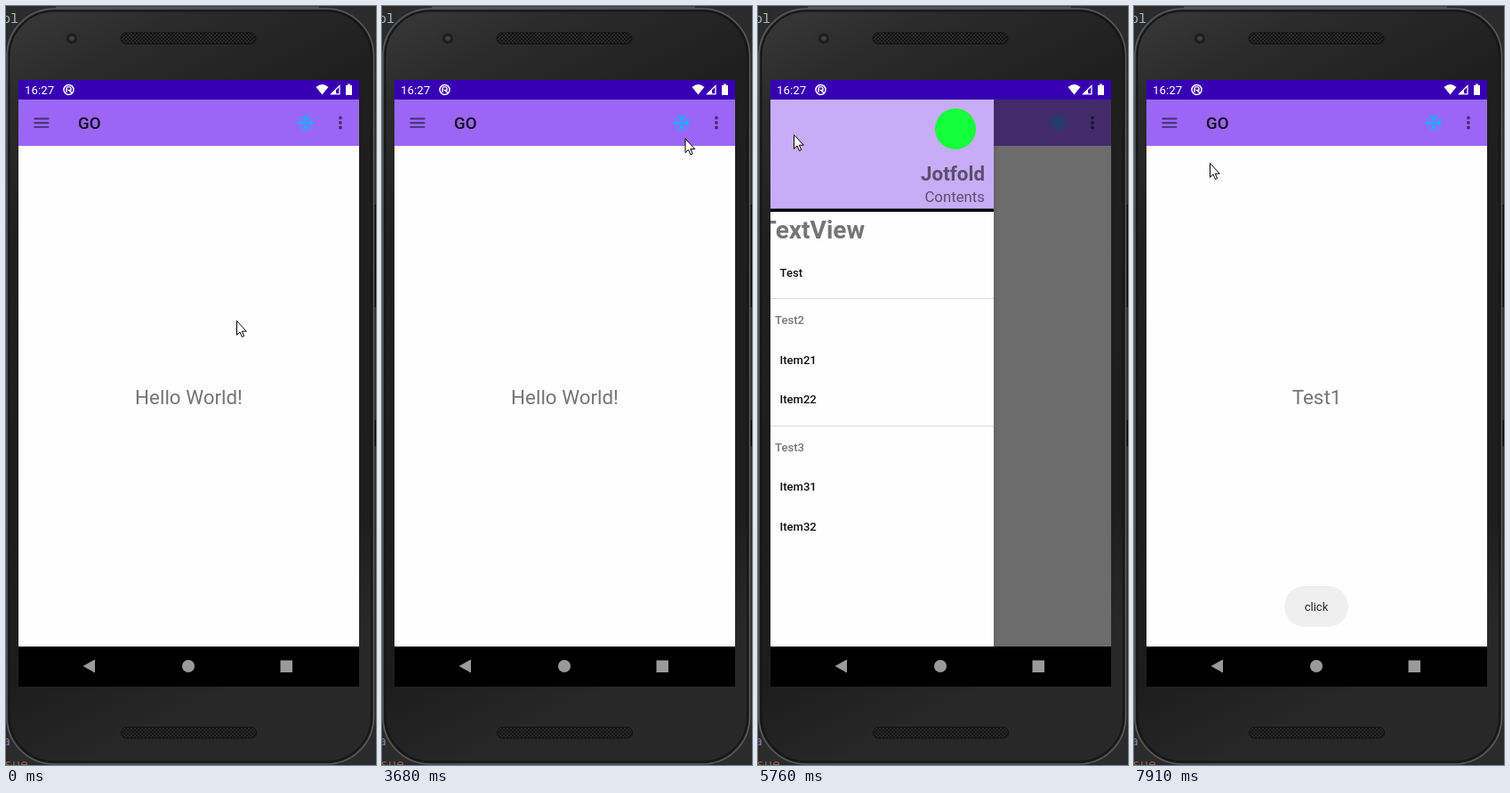
Animation of 416 by 852 pixels, one loop 7990 ms. Source, as an HTML page:

```html
<!DOCTYPE html>
<html lang="en">
<head>
<meta charset="utf-8">
<title>App bar and drawer demo</title>
<style>
  html, body { margin: 0; height: 100%; overflow: hidden; background: #2b2b2b; }
  svg { display: block; width: 416px; height: 852px; font-family: Roboto, sans-serif; }
  .code { font: 15px "Noto Sans Mono", monospace; }
  .soft { fill: #000; fill-opacity: .54; }
  .grey { fill: #757575; }
  .end { text-anchor: end; }
  .mid { text-anchor: middle; }
  .row { font-size: 13.05px; font-weight: 500; }
  .menu { font-size: 14.9px; fill: #212121; }
</style>
</head>
<body>
<svg viewBox="0 0 416 852">
  <defs>
    <linearGradient id="body" x2=".25" y2="1">
      <stop offset="0" stop-color="#393939"/>
      <stop offset=".12" stop-color="#2b2b2b"/>
      <stop offset=".3" stop-color="#1f1f1f"/>
      <stop offset=".85" stop-color="#1d1d1d"/>
      <stop offset="1" stop-color="#282828"/>
    </linearGradient>
    <pattern id="mesh" width="4" height="4" patternUnits="userSpaceOnUse">
      <rect width="4" height="4" fill="#292929"/>
      <circle cx="1" cy="1" r="1" fill="#0b0b0b"/>
      <circle cx="3" cy="3" r="1" fill="#0b0b0b"/>
    </pattern>
    <filter id="shadow" x="-20%" y="-20%" width="140%" height="140%">
      <feDropShadow dx="0" dy="1.5" stdDeviation="2" flood-opacity=".28"/>
    </filter>
    <clipPath id="screen"><path d="M14 105H397V719H14Z"/></clipPath>
    <clipPath id="testRow"><path d="M14 276H275V321H14Z"/></clipPath>
    <clipPath id="reveal"><rect id="revealBox"/></clipPath>
    <path id="arm" d="M0 0V-9.3M-4.7 -7.9L0 -3.2L4.7 -7.9"/>
  </defs>

  <g class="code">
    <text x="-4" y="19" fill="#a9b7c6">pl</text>
    <text x="-4" y="830" fill="#8b7ba8">a</text>
    <text x="-2" y="856" fill="#8a6544">sue</text>
  </g>

  <!-- phone -->
  <path d="M56 1.5H352" stroke="#555" stroke-width="2"/>
  <path d="M415 223V338M415 465V494" stroke="#0c0c0c" stroke-width="3"/>
  <rect x="1" y="3" width="412.5" height="848" rx="53" fill="url(#body)" stroke="#5a5a5a" stroke-width="1.6"/>
  <rect x="3.5" y="5.500" width="407.500" height="843" rx="51" fill="none" stroke="#161616" stroke-width="2"/>
  <rect x="129" y="30" width="152" height="12.500" rx="6" fill="url(#mesh)" stroke="#111"/>
  <rect x="129.500" y="809.500" width="152" height="12.500" rx="6" fill="url(#mesh)" stroke="#111"/>
  <circle cx="74" cy="36.500" r="6" fill="#1d1d1d"/>
  <circle cx="74" cy="36.500" r="2.800" fill="#3c4444"/>

  <!-- system bars -->
  <path d="M14 83H397V105H14Z" fill="#3700b3"/>
  <path d="M14 719H397V764H14Z"/>
  <g fill="#fff">
    <text x="21" y="99" font-size="13.300">16:27</text>
    <circle cx="70.500" cy="94" r="5.500" fill="none" stroke="#fff" stroke-width="1.500"/>
    <path d="M68 97V92.500A2.600 2.600 0 0 1 73 92.500V94.500H70.500L74.500 98" fill="none" stroke="#fff" stroke-width="1.400"/>
    <path d="M348.500 91Q355.500 85 362.500 91L355.500 99.500Z"/>
    <path d="M375 89.500V98.800H365.700Z" fill="none" stroke="#fff" stroke-width="1.300"/>
    <path d="M371 93V99H365Z"/>
    <path d="M384 87.500H387V89H389V100H382V89H384Z"/>
  </g>
  <g fill="#9a9a9a">
    <path d="M86.500 741L100 733.500V748.500Z"/>
    <circle cx="205" cy="741" r="7"/>
    <path d="M308.500 734.500H322V748H308.500Z"/>
  </g>

  <!-- app -->
  <g clip-path="url(#screen)">
    <path d="M14 157H397V719H14Z" fill="#fefefe"/>
    <path d="M14 105H397V157H14Z" fill="#9b66f6"/>
    <path d="M31.500 126.500H48.300M31.500 131.200H48.300M31.500 135.900H48.300" stroke="#000" stroke-opacity=".54" stroke-width="1.870"/>
    <text x="81" y="138" font-size="18.640" font-weight="500" fill-opacity=".87">GO</text>
    <g transform="translate(337 131)" stroke="#29a6fb" stroke-width="1.870" fill="none">
      <use href="#arm"/><use href="#arm" transform="rotate(90)"/>
      <use href="#arm" transform="rotate(180)"/><use href="#arm" transform="rotate(270)"/>
    </g>
    <g class="soft">
      <circle cx="376" cy="125.500" r="1.900"/><circle cx="376" cy="131" r="1.900"/><circle cx="376" cy="136.500" r="1.900"/>
    </g>
    <circle id="iconRipple" cx="337" cy="131"/>
    <text id="label" class="grey mid" x="205.500" y="447" font-size="22.400"></text>

    <g id="menu" clip-path="url(#reveal)">
      <rect x="210.500" y="109" width="182.500" height="104" rx="3" fill="#fefefe" filter="url(#shadow)"/>
      <text class="menu" x="225.500" y="144.500">Item2</text>
      <text class="menu" x="225.500" y="189.500">Item3</text>
    </g>

    <g id="toast">
      <rect x="169" y="651" width="72" height="46" rx="23" fill="#efefef"/>
      <text class="mid" x="205" y="679" font-size="13.050" fill="#222">click</text>
    </g>

    <path id="scrim" d="M14 105H397V719H14Z"/>
    <g id="drawer">
      <path d="M14 105H275V719H14Z" fill="#fefefe" filter="url(#shadow)"/>
      <path d="M14 105H275V228H14Z" fill="#c7adf5"/>
      <path d="M14 227.500H275V231H14Z"/>
      <circle cx="232" cy="138" r="23" fill="#14ff3c"/>
      <text class="soft end" x="265" y="196" font-size="22.400" font-weight="700">Jotfold</text>
      <text class="soft end" x="265" y="220" font-size="16.800">Contents</text>
      <text class="grey end" x="130" y="261" font-size="28" font-weight="700">TextView</text>
      <g clip-path="url(#testRow)"><circle id="rowRipple" cx="119" cy="310" fill="#efefef"/></g>
      <path d="M14 328.500H275M14 471.500H275" stroke="#dadada"/>
      <g id="rows" class="row"></g>
    </g>
  </g>

  <g id="pointer">
    <circle id="press" r="12.300" fill="#ff0" fill-opacity=".5"/>
    <path d="M.5 .5V16.300L4 13L6.500 18.500L8.700 17.500L6.300 12.200H11.300Z" fill="#fff" stroke="#000"/>
  </g>
</svg>
<script>
const LOOP = 7990, STEP = 76.9;
const $ = id => document.getElementById(id);
const set = (id, attrs) => { for (const k in attrs) $(id).setAttribute(k, attrs[k]); };
const ramp = (t, from, to) => Math.min(1, Math.max(0, (t - from) / (to - from)));
const settle = x => 1 - (1 - x) ** 5;

// time, x, y of the pointer tip
const path = [
  [0, 259, 353], [679, 259, 353], [680, 260, 351], [846, 260, 351],
  [1690, 377, 143], [1920, 380, 140], [2690, 380, 140], [2990, 300, 292],
  [3080, 300, 292], [3530, 340, 164], [3840, 341, 134], [3950, 341, 134],
  [4760, 94, 181], [5380, 18, 129], [5540, 18, 129], [5760, 40, 144],
  [5860, 40, 144], [6300, 104, 264], [6530, 119, 310], [7385, 119, 310], [7910, 85, 176]
];
const presses = [[1920, 2070], [2990, 3145], [3840, 3990], [5380, 5530], [7230, 7380]];

function pointerAt(t) {
  const i = path.findIndex(p => p[0] > t);
  if (i < 0) return path.at(-1).slice(1);
  const [a, b] = [path[i - 1], path[i]], k = ramp(t, a[0], b[0]);
  return [1, 2].map(n => a[n] + (b[n] - a[n]) * k);
}

[["Test", 303.5], ["Test2", 357], ["Item21", 401.5], ["Item22", 446],
 ["Test3", 499.5], ["Item31", 544], ["Item32", 588.5]].forEach(([name, y]) => {
  const head = /^Test\d/.test(name);
  $("rows").insertAdjacentHTML("beforeend",
    `<text x="${head ? 29 : 34.5}" y="${y}" fill="${head ? "#757575" : "#111"}">${name}</text>`);
});

function draw(t) {
  set("pointer", { transform: `translate(${pointerAt(t)})` });
  set("press", { visibility: presses.some(([a, b]) => t >= a && t < b) ? "visible" : "hidden" });
  $("label").textContent = t < 3990 ? "Hello World!" : t < 7300 ? "Item1" : "Test1";

  const grow = settle(ramp(t, 2030, 2380));
  set("revealBox", { x: 397 - 195 * grow, y: 105, width: 195 * grow, height: 115 * grow });
  set("menu", { opacity: ramp(t, 2030, 2250) * (1 - ramp(t, 3080, 3300)) });

  set("iconRipple", {
    r: 10 + 8.5 * ramp(t, 3950, 4200),
    opacity: t < 3950 ? 0 : .12 * (1 - ramp(t, 4150, 4500))
  });

  const open = settle(ramp(t, 5522, 6034)) * (1 - settle(ramp(t, 7354, 7866)));
  set("drawer", {
    transform: `translate(${261 * (open - 1)})`,
    visibility: open > 0 ? "visible" : "hidden"
  });
  set("scrim", { opacity: .58 * open ** .4 });
  set("rowRipple", { r: t < 7360 ? 0 : 82 + (t - 7382) * .5 });
  set("toast", { opacity: ramp(t, 7480, 7800) });
}

const start = performance.now();
function tick() {
  const t = (performance.now() - start) % LOOP;
  draw(Math.floor((t + 13) / STEP) * STEP);
  requestAnimationFrame(tick);
}
tick();
</script>
</body>
</html>
```
